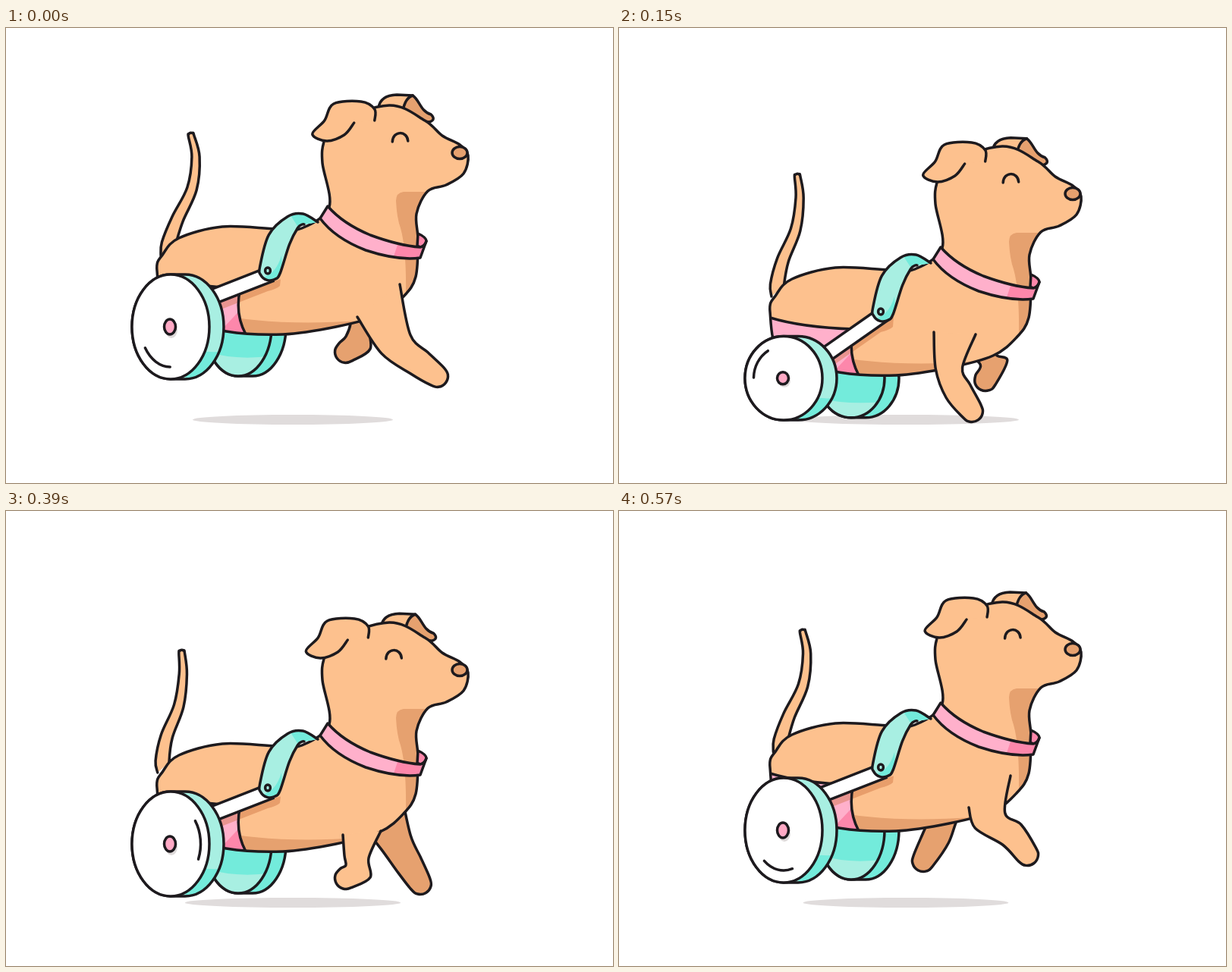
Animation of 800x600 px, one loop 0.6 s. Source, as an HTML page with a canvas:

```html
<!DOCTYPE html>
<html lang="en">
<head>
<meta charset="utf-8">
<title>Running dog on wheels</title>
<style>
  html, body { margin: 0; width: 100%; height: 100%; overflow: hidden; background: #fff; }
  canvas { display: block; }
</style>
</head>
<body>
<canvas id="stage" width="800" height="600"></canvas>
<script>
const ctx = document.getElementById('stage').getContext('2d');
const LOOP = 600, TICK = 30, POSES = 8, GROUND = 54;
const INK = '#1d1a1e', SKIN = '#fdc18e', TAN = '#e6a16f', PINK = '#ffb0cb', ROSE = '#fd87ab';
const MINT = '#a8efe2', TEAL = '#73ebdb';

const points = text => text.split(' ').map(p => p.split(',').map(Number));

// Smooth path through a list of points
function curve(pts, closed = false) {
  const n = pts.length, path = new Path2D();
  const at = i => closed ? pts[(i + n) % n] : pts[Math.max(0, Math.min(n - 1, i))];
  path.moveTo(...pts[0]);
  for (let i = 0; i < (closed ? n : n - 1); i++) {
    const [a, b, c, d] = [at(i - 1), at(i), at(i + 1), at(i + 2)];
    path.bezierCurveTo(b[0] + (c[0] - a[0]) / 6, b[1] + (c[1] - a[1]) / 6,
      c[0] - (d[0] - b[0]) / 6, c[1] - (d[1] - b[1]) / 6, c[0], c[1]);
  }
  if (closed) path.closePath();
  return path;
}

// Round-ended limb: open root between two edge points, then joints with radii
function limb([left, right, ...joints], radii) {
  const spine = [[(left[0] + right[0]) / 2, (left[1] + right[1]) / 2], ...joints];
  const a = [left], b = [right];
  joints.forEach(([x, y], i) => {
    const from = spine[i], to = spine[i + 2] || [x, y], r = radii[i];
    const angle = Math.atan2(to[1] - from[1], to[0] - from[0]);
    const around = turn => [x + r * Math.cos(angle + turn), y + r * Math.sin(angle + turn)];
    a.push(around(Math.PI / 2));
    b.unshift(around(-Math.PI / 2));
    if (i === joints.length - 1) a.push(...[1, 0, -1].map(k => around(k * Math.PI / 4)));
  });
  return curve([...a, ...b]);
}

function oval(x, y, rx, ry, from = 0, to = Math.PI * 2) {
  const path = new Path2D();
  path.ellipse(x, y, rx, ry, 0, from, to);
  return path;
}

function paint(path, fill, ink = INK) {
  if (fill) { ctx.fillStyle = fill; ctx.fill(path); }
  if (ink) { ctx.strokeStyle = ink; ctx.lineWidth = 3.5; ctx.stroke(path); }
}

function inside(path, draw) {
  ctx.save();
  ctx.clip(path);
  draw();
  ctx.restore();
}

function shifted(x, y, draw) {
  ctx.save();
  ctx.translate(x, y);
  draw();
  ctx.restore();
}

// One stride of the near leg: two hip edges, knee, ankle, paw
const stride = [
  '463,381 519,338 514,417 545,442 568,459',
  '468,383 519,340 512,405 529,434 544,459',
  '415,347 470,350 435,395 447,425 465,451',
  '412,352 462,372 428,395 416,425 399,456',
  '454,377 494,376 465,404 462,428 446,440',
  '444,382 494,377 462,411 464,430 448,439',
  '467,367 524,341 475,385 492,400 481,423',
  '461,373 516,331 489,390 518,409 538,435'
].map(text => {
  const pts = points(text), [a, b] = pts;
  return limb(pts, [.32 * Math.hypot(a[0] - b[0], a[1] - b[1]), 18, 14.5]);
});

// Two bounces per loop, the second one a little deeper
function bodyDrop(pose) {
  const angle = pose * Math.PI / 2, half = pose < POSES / 2 ? 27 : 31.5;
  return half * (1 - Math.cos(angle)) + 13.5 * Math.sin(angle);
}

// The wheels stop at the ground and trail the body on the way up
function wheelDrop(pose) {
  const trail = pose > 2 && pose % 4 % 3 === 0 ? 9 : 0;
  return Math.min(GROUND, bodyDrop(pose) + trail);
}

const rodSlope = pose => pose && pose % 2 === 0 ? .7 : .39;

const dog = curve(points('426,236 390,264 356,265 285,262 228,277 207,298 199,320 215,380 290,400 365,404 435,394 493,378 524,354 540,328 543,280 541,245 556,215 580,207 603,192 609,168 598,154 575,142 552,122 505,102 432,125 419,150 417,178'), true);
const nearEar = curve(points('486,122 486,107 468,97 432,100 420,122 404,140 423,149 446,141 459,125'));
const farEar = new Path2D('M491 105Q493 89 515 88L536 89C545 95 546 110 560 114Q567 121 558 124L551 123');
const earFold = new Path2D('M523 109Q526 92 536 89C545 95 546 110 560 114Q567 121 558 124L551 123Z');
const earCrease = new Path2D('M523 109Q526 92 536 89');
const eye = new Path2D('M509.5 150C510 135 529 135 530 149');

const neckShade = new Path2D('M550 216L524 216Q514 217 514 228Q515 250 520 264Q528 292 527 354H560V216Z');
const bellyShade = new Path2D('M270 376Q350 394 466 386L470 420H270Z');
const diaper = new Path2D('M190 325Q240 341 309 343Q301 376 316 404V430H190Z');
const diaperLine = new Path2D('M196 327Q240 341 309 343Q301 376 316 404');
const diaperShade = new Path2D('M316 364L284 398V420H320Z');

const strap = limb(points('411,256 393,259 391,252 378,256 360,279 348,319'), [7, 10, 15, 14]);
const strapShade = new Path2D('M373 244L386 264L412 260V240ZM363 300Q356 325 336 330V340H366Z');

const collar = new Path2D('M424 235Q444 258 480 273Q518 287 546 289Q552 288 554 281L546 303Q516 307 474 293Q433 277 414 251Z');
const collarShade = new Path2D('M518 280L508 310H560V280Z');
const collarBack = new Path2D('M543 271Q554 276 554 281Q552 288 546 289L542 287Z');

// Wheels are built around their own centre line
function disc(x, rx, ry, depth) {
  const path = oval(x, 0, rx, ry, Math.PI / 2, Math.PI * 1.5);
  path.lineTo(x + depth, -ry);
  path.ellipse(x + depth, 0, rx, ry, 0, -Math.PI / 2, Math.PI / 2);
  path.closePath();
  return path;
}
const nearDisc = disc(217, 51, 69, 19), nearFace = oval(217, 0, 51, 69);
const farDisc = disc(306, 44, 65, 19), farFace = oval(306, 0, 44, 65);
const farShine = new Path2D('M255 30Q300 46 352 38V80H255Z');
const rimShade = new Path2D('M255 31Q270 35 292 32V80H230Z');

// Squash a shape but keep its line weight even
function squashed(path, y, s) {
  const out = new Path2D();
  out.addPath(path, new DOMMatrix([1, 0, 0, s, 0, y]));
  return out;
}

function farWheel(y, s) {
  const face = squashed(farFace, y, s);
  paint(squashed(farDisc, y, s), TEAL);
  inside(face, () => paint(squashed(farShine, y, s), MINT, null));
  paint(face);
}

function nearWheel(y, s, turn) {
  const rim = squashed(nearDisc, y, s);
  paint(rim, MINT, null);
  inside(rim, () => paint(squashed(rimShade, y, s), TEAL, null));
  paint(rim);
  paint(squashed(nearFace, y, s), '#fff');
  paint(squashed(oval(217, 0, 39.5, 53, turn - .5, turn + .5), y, s));
  paint(oval(218, y + 4 * s, 8, 11 * s), '#dedada', null);
  paint(oval(216, y, 7.5, 10 * s), '#ffa9c5');
}

function rod(slope) {
  const line = new Path2D();
  line.moveTo(350, 326 - slope * 5);
  line.lineTo(262, 326 + slope * 83);
  ctx.lineCap = 'butt';
  for (const [color, width] of [[INK, 23], ['#fff', 16]]) {
    ctx.strokeStyle = color;
    ctx.lineWidth = width;
    ctx.stroke(line);
  }
  ctx.lineCap = 'round';
}

function rodShade(slope) {
  const end = 347 + slope * 75;
  paint(new Path2D(`M362 ${337 - slope * 14}L361 340Q357 344 345 347L270 ${end}V${end - 22}Z`),
    'rgba(200,105,55,.4)', null);
}

// The tail bends most around its middle
function tail(sway) {
  const root = points('222,284 204,300'), spine = points('214,285 226,252 245,212 250,170 244,142');
  const bent = spine.map(([x, y], i) => [x - sway * 25 * Math.sin(Math.PI * (.15 + .15 * i)), y]);
  const moved = root.map(([x, y]) => [x - sway * 6, y]);
  paint(limb([...moved, ...bent], spine.map((_, i) => 9 - 1.3 * i)), SKIN);
}

function torso(slope) {
  paint(dog, SKIN, null);
  inside(dog, () => {
    paint(neckShade, TAN, null);
    paint(bellyShade, TAN, null);
    paint(diaper, PINK, null);
    inside(diaper, () => paint(diaperShade, ROSE, null));
    rodShade(slope);
    paint(diaperLine);
  });
  paint(dog);
}

function harness(slope) {
  rod(slope);
  paint(strap, MINT, null);
  inside(strap, () => paint(strapShade, TEAL, null));
  paint(strap);
  paint(oval(345, 320, 3.4, 4), MINT);
}

function neckband() {
  paint(collarBack, ROSE);
  paint(collar, PINK, null);
  inside(collar, () => paint(collarShade, ROSE, null));
  paint(collar);
}

function draw(t) {
  const pose = Math.floor(t / LOOP * POSES);
  const body = bodyDrop(pose), wheel = wheelDrop(pose), slope = rodSlope(pose);
  const squash = wheel === GROUND ? .8 : 1;
  const axle = 394 + wheel + 69 * (1 - squash);
  const sway = 1 - Math.abs(1 - t / 300);
  const spread = 1 - Math.abs(1 - t % 300 / 150);
  const face = -4.8 * (1 - Math.cos((t - 30) / LOOP * Math.PI * 2));

  ctx.fillStyle = '#fff';
  ctx.fillRect(0, 0, 800, 600);
  paint(oval(378, 516.5, 132 + 17 * spread, 6.5), '#e0dcdc', null);
  farWheel(axle, squash);
  shifted(0, body, () => {
    tail(sway);
    shifted(2, -13, () => paint(stride[(pose + POSES / 2) % POSES], TAN));
    shifted(-.4 * face, .05 * body, () => {
      paint(farEar, SKIN, null);
      paint(earFold, TAN, null);
      paint(farEar);
      paint(earCrease);
    });
    torso(slope);
    paint(stride[pose], SKIN);
    harness(slope);
    neckband();
    shifted(face, 0, () => {
      paint(nearEar, SKIN);
      paint(eye);
    });
    paint(oval(598, 164.5, 10, 8), TAN);
  });
  nearWheel(axle, squash, 2.09 + t / LOOP * Math.PI * 2);
}

ctx.lineCap = ctx.lineJoin = 'round';
const begin = performance.now();
function loop() {
  const t = (performance.now() - begin) % LOOP;
  draw(Math.floor(t / TICK) * TICK);
  requestAnimationFrame(loop);
}
loop();
</script>
</body>
</html>
```
